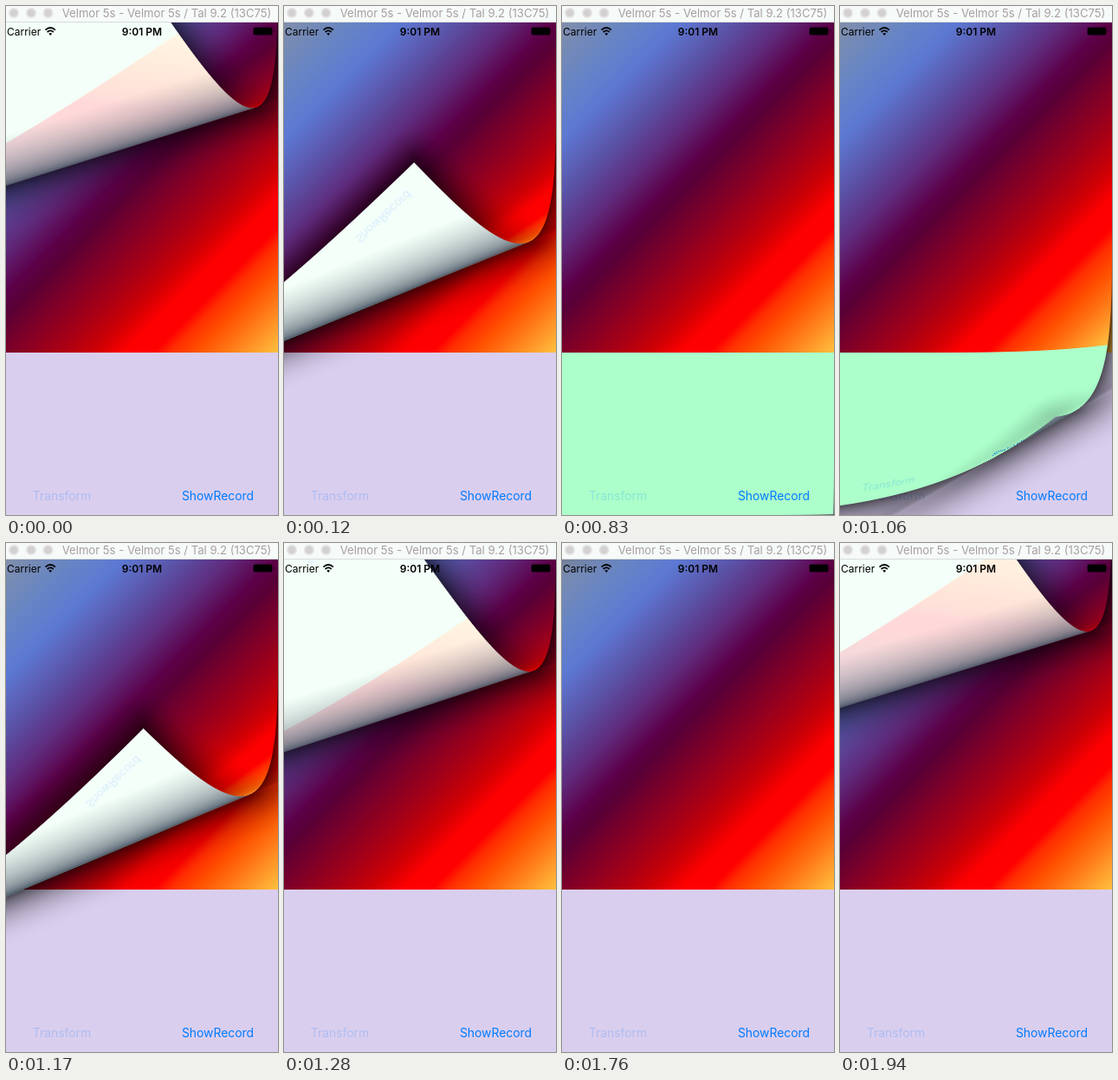
An HTML page with a canvas that plays this animation: 314 by 586 pixels, repeating every 2040 ms.

```html
<!DOCTYPE html>
<html lang="en">
<head>
<meta charset="utf-8">
<title>Page curl</title>
<style>
  html, body { margin: 0; width: 314px; height: 586px; overflow: hidden; background: #d9ceee; }
  canvas, svg { position: absolute; left: 0; top: 0; display: block; }
  canvas { top: 19px; }
  text { font-family: Inter, Roboto, sans-serif; }
</style>
</head>
<body>
<canvas id="stage" width="314" height="567"></canvas>
<svg width="314" height="586" viewBox="0 0 314 586">
  <rect width="314" height="19" fill="#f6faf8"/>
  <rect y="18" width="314" height="1" fill="#d8dbda"/>
  <g fill="#d3d0d1" stroke="#e3e1e1" stroke-width="2">
    <circle cx="9" cy="8" r="5"/><circle cx="29" cy="8" r="5"/><circle cx="48.5" cy="8" r="5"/>
  </g>
  <text x="185.5" y="13" font-size="13.1" text-anchor="middle" fill="#a79fa2">Velmor 5s - Velmor 5s / Tal 9.2 (13C75)</text>
  <text x="1" y="33.5" font-size="12">Carrier</text>
  <text x="157" y="33.5" font-size="12" font-weight="600" text-anchor="middle">9:01 PM</text>
  <g fill="none" stroke="#000" stroke-width="1.7">
    <path d="M45.5 27.6Q51.2 22.4 56.9 27.6M47.6 30Q51.2 26.7 54.8 30"/>
    <path d="M51.2 34L49.3 31.8Q51.2 30.3 53.1 31.8Z" fill="#000" stroke="none"/>
  </g>
  <rect x="285.5" y="24.5" width="22" height="9" rx="2" fill="none" stroke="#000" stroke-opacity=".4"/>
  <rect x="286" y="25" width="21" height="8" rx="1.5"/>
  <path d="M309 27.5q1.6 1.5 0 3z"/>
</svg>
<script>
const W = 314, H = 567, PHOTO = 380, R = 148, LOOP = 2040;
const canvas = document.getElementById('stage');
const ctx = canvas.getContext('2d');

// [time, distance of the flat part along the curl normal]
const STEPS = [
  [0, 31.5], [60, 110], [120, 192], [180, 276], [240, 359], [300, 438],
  [360, 505], [410, 552], [470, 585], [530, 999],
  [830, 578], [890, 543], [950, 500], [1010, 445], [1060, 375], [1120, 295],
  [1170, 210], [1220, 137], [1280, 63], [1340, -10],
  [1400, -80], [1460, -142], [1520, -182], [1580, -999],
  [1760, -178], [1820, -125], [1880, -60], [1940, 15.5]
];

const SKY = [
  [0, '#808eaa'], [80, '#6684c4'], [135, '#5c78d2'], [200, '#5a52a6'], [260, '#5f2a7c'],
  [310, '#5c0048'], [335, '#580036'], [380, '#7c0028'], [440, '#aa0014'], [480, '#cc0004'],
  [515, '#fc0000'], [550, '#ff0000'], [568, '#ff2c00'], [598, '#ff5000'], [630, '#ff7414'],
  [694, '#ffc040']
];
const SLATE = [60, 72, 90];

function label(g, text, x, alpha) {
  g.fillStyle = `rgba(0,122,255,${alpha})`;
  g.fillText(text, x, 550);
}

function makePage(color) {
  const c = document.createElement('canvas');
  c.width = W;
  c.height = H;
  const g = c.getContext('2d');
  g.fillStyle = color;
  g.fillRect(0, 0, W, H);
  const sky = g.createLinearGradient(0, 0, 347, 347);
  for (const [u, col] of SKY) sky.addColorStop(u / 694, col);
  g.fillStyle = sky;
  g.fillRect(0, 0, W, PHOTO);
  g.font = '13.9px Inter, Roboto, sans-serif';
  g.textAlign = 'center';
  label(g, 'Transform', 64.5, 0.2);
  label(g, 'ShowRecord', 244.5, 1);
  return g.getImageData(0, 0, W, H).data;
}

const lower = makePage('#d9ceee');
const upper = makePage('#abffca');

const clamp = (v, a, b) => v < a ? a : v > b ? b : v;
const fade = (d, w, power) => d < w ? Math.pow(1 - d / w, power) : 0;
// Page pixels per screen pixel across an edge whose normal makes cosine n with the curl
const stretch = (n, g) => Math.sqrt(1 + n * n * g * (2 + g));

function sample(tex, x, y, out) {
  x = clamp(x - 0.5, 0, W - 1);
  y = clamp(y - 0.5, 0, H - 1);
  const x0 = x | 0, y0 = y | 0, fx = x - x0, fy = y - y0;
  const a = (y0 * W + x0) * 4;
  const b = x0 < W - 1 ? a + 4 : a;
  const down = y0 < H - 1 ? W * 4 : 0;
  for (let i = 0; i < 3; i++) {
    const top = tex[a + i] + (tex[b + i] - tex[a + i]) * fx;
    const bot = tex[a + down + i] + (tex[b + down + i] - tex[a + down + i]) * fx;
    out[i] = top + (bot - top) * fy;
  }
}

// The upper page wraps round a cylinder of radius R lying on the lower page.
function render(c) {
  const img = ctx.createImageData(W, H), px = img.data;
  const lift = clamp((c + 80) / 518, 0, 1.36);
  const angle = (16 + 17.3 * Math.pow(lift, 1.65)) * Math.PI / 180;
  const nx = Math.sin(angle), ny = Math.cos(angle);
  const col = [0, 0, 0], mix = [0, 0, 0];

  for (let j = 0, o = 0; j < H; j++) for (let i = 0; i < W; i++, o += 4) {
    const x = i + 0.5, y = j + 0.5;
    const t = x * nx + y * ny - c;
    const tc = Math.min(t, R), over = t - tc;
    const phi = tc > 0 ? Math.asin(tc / R) : 0, cos = Math.cos(phi);
    const roll = clamp(R - t + 0.5, 0, 1);
    const slope = 1 / Math.max(cos, 0.25);

    const kf = (tc > 0 ? R * phi - tc : 0) - over;
    const fx = x + nx * kf, fy = y + ny * kf;
    const fdx = (fx - W) / stretch(nx, slope - 1), fdy = (fy - H) / stretch(ny, slope - 1);
    const front = Math.min(roll, clamp(0.5 - Math.max(fdx, fdy), 0, 1));

    const kb = (tc > 0 ? R * (Math.PI - phi) : R * Math.PI - tc) - tc - over;
    const bx = x + nx * kb, by = y + ny * kb;
    const bdx = (bx - W) / stretch(nx, -slope - 1), bdy = (by - H) / stretch(ny, -slope - 1);
    const back = Math.min(roll, clamp(0.5 - Math.max(bdx, bdy), 0, 1));

    if (front < 1) {
      const d = Math.hypot(Math.max(fdx, 0), Math.max(fdy, 0), over);
      const light = 1 - 0.65 * fade(d, 64 * Math.sin(phi), 2.7);
      sample(lower, x, y, col);
      for (let k = 0; k < 3; k++) mix[k] = col[k] * light;
    }
    if (front > 0 && back < 1) {
      const d = Math.hypot(Math.max(bdx, 0), Math.max(bdy, 0));
      const light = 1 - 0.62 * cos * fade(d, 48, 2);
      sample(upper, fx, fy, col);
      for (let k = 0; k < 3; k++) mix[k] += (col[k] * light - mix[k]) * front;
    }
    if (back > 0) {
      const shade = Math.max(0, 1 - 1.27 * cos);
      sample(upper, bx, by, col);
      for (let k = 0; k < 3; k++) {
        const pale = 216.75 + 0.15 * col[k];
        mix[k] += (pale + (SLATE[k] - pale) * shade - mix[k]) * back;
      }
    }
    for (let k = 0; k < 3; k++) px[o + k] = mix[k] + 0.5;
    px[o + 3] = 255;
  }
  return img;
}

const cache = [];
const start = performance.now();
let shown = -1;

function tick() {
  const t = (performance.now() - start) % LOOP;
  let n = STEPS.length - 1;
  while (STEPS[n][0] > t) n--;
  if (n !== shown) {
    cache[n] = cache[n] || render(STEPS[n][1]);
    ctx.putImageData(cache[n], 0, 0);
    shown = n;
  }
  requestAnimationFrame(tick);
}
tick();
</script>
</body>
</html>
```
